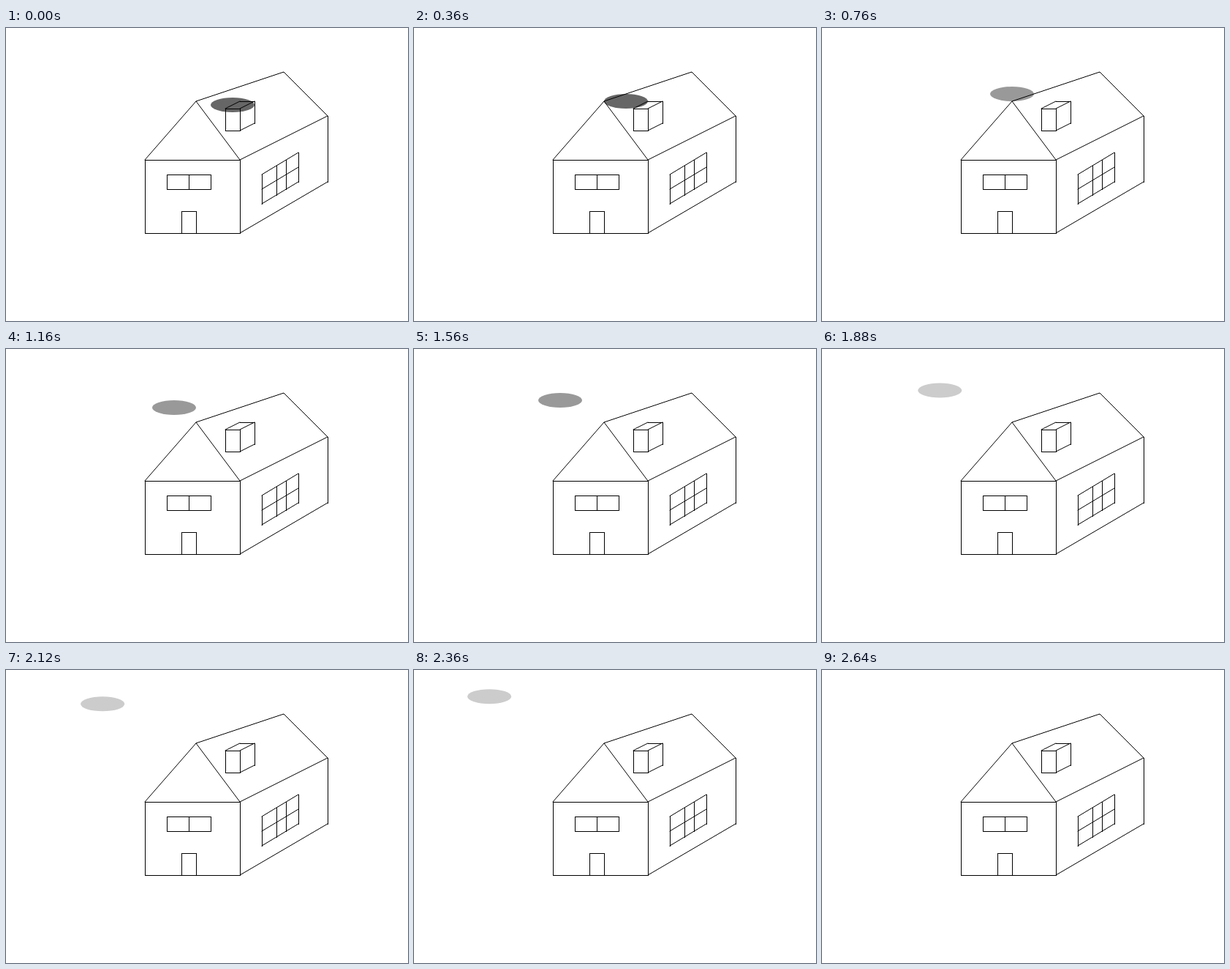
An HTML page that plays this animation: 550x400 px, repeating every 3 s.

```html
<!DOCTYPE html>
<html lang="en">
<head>
<meta charset="utf-8">
<title>House with smoke</title>
<style>
  html, body { margin: 0; width: 100%; height: 100%; overflow: hidden; background: #fff; }
  svg { display: block; width: 550px; height: 400px; }
  .house { fill: none; stroke: #000; stroke-width: 1; }
  .straight { stroke-linecap: square; shape-rendering: crispEdges; }
  .slanted { stroke-linecap: round; }
</style>
</head>
<body>
<svg viewBox="0 0 550 400">
  <ellipse id="smoke" cx="310" cy="105" rx="30" ry="10" fill="#666"/>
  <g class="house">
    <!-- upright and level edges sit on whole pixels -->
    <g class="straight" transform="translate(.5 .5)">
      <path d="M190 180H320V280H190ZM440 120V210"/>
      <path d="M220 200H280V220H220ZM250 200V220M240 280V250H260V280"/>
      <path d="M350 200V240M370 188V228M383 180V220M400 170V210"/>
      <path d="M300 110H320V140H300ZM320 100H340V130"/>
    </g>
    <!-- roof, side wall, side window, chimney -->
    <g class="slanted">
      <path d="M190 180L260 100L320 180L440 120L380 60L260 100M320 280L440 210"/>
      <path d="M350 200L400 170M350 220L400 190M350 240L400 210"/>
      <path d="M300 110L320 100M320 110L340 100M320 140L340 130"/>
    </g>
  </g>
</svg>
<script>
  const LOOP = 3000, TICK = 40;
  const DRIFT_START = 1560, DRIFT_END = 2600;
  const smoke = document.getElementById('smoke');

  // start time, centre x, centre y, fill
  const puffs = [
    [0, 310, 105, '#666'],
    [360, 290, 100, '#666'],
    [760, 260, 90, '#999'],
    [1160, 230, 80, '#999'],
    [1560, 200, 70, '#999']
  ];

  function smokeAt(t) {
    if (t > DRIFT_END) return null;
    if (t > DRIFT_START) {
      const k = (t - DRIFT_START) / (DRIFT_END - DRIFT_START);
      return [200 - 126 * k, 70 - 44 * k, '#ccc'];
    }
    return puffs.filter(p => p[0] <= t).pop().slice(1);
  }

  function draw(now) {
    const t = Math.floor((now % LOOP) / TICK) * TICK;
    const state = smokeAt(t);
    smoke.setAttribute('visibility', state ? 'visible' : 'hidden');
    if (state) {
      ['cx', 'cy', 'fill'].forEach((name, i) => smoke.setAttribute(name, state[i]));
    }
  }

  const start = performance.now();
  function frame() {
    draw(performance.now() - start);
    requestAnimationFrame(frame);
  }
  frame();
</script>
</body>
</html>
```
